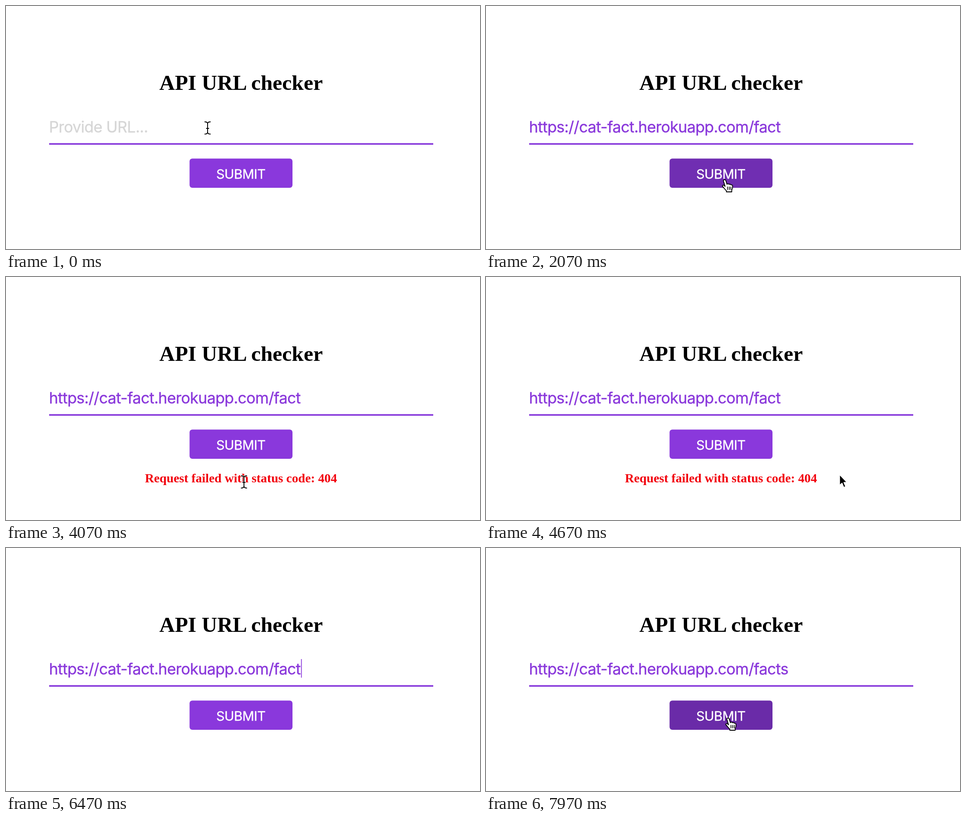
Animation of 1044x536 px, one loop 8 s. Source, as an HTML page:

```html
<!DOCTYPE html>
<html lang="en">
<head>
<meta charset="utf-8">
<title>API URL checker</title>
<style>
  html, body { margin: 0; width: 100%; height: 100%; overflow: hidden; background: #fff; }
  svg { display: block; width: 100%; height: 100%; }
  .serif { font-family: "Liberation Serif", Times, serif; font-weight: 700; text-anchor: middle; }
  .sans {
    font-family: Inter, "Open Sans", sans-serif; letter-spacing: -0.0195em;
    fill: currentColor; stroke: currentColor; stroke-width: .4;
  }
</style>
</head>
<body>
<svg viewBox="0 0 1044 536">
  <text class="serif" x="517.7" y="184.6" font-size="47.3">API URL checker</text>

  <text id="field" class="sans" x="94.8" y="279" font-size="34"></text>
  <rect id="caret" y="245" width="1.7" height="41" fill="#8a38db"/>
  <rect x="95" y="302.5" width="846" height="3.5" fill="#8739db"/>

  <rect id="button" x="404.3" y="336.4" width="226.7" height="64.6" rx="6"/>
  <text class="sans" x="517.2" y="381" font-size="29" color="#fff" text-anchor="middle">SUBMIT</text>
  <text id="error" class="serif" x="517.5" y="453" font-size="27.75" fill="#f2000c">Request failed with status code: 404</text>

  <defs>
    <path id="beamShape" d="M-6-13.5Q-1-13.5 0-10Q1-13.5 6-13.5M0-10V10M-6 13.5Q-1 13.5 0 10Q1 13.5 6 13.5M-2.5 1H2.5"/>
  </defs>
  <g id="pointer" stroke-linecap="round" stroke-linejoin="round">
    <g id="beam" fill="none">
      <use href="#beamShape" stroke="#fff" stroke-width="3.6"/>
      <use href="#beamShape" stroke="#000" stroke-width="1.9"/>
    </g>
    <path id="arrow" d="M0 0V23.5L5.3 18.6L9.2 28L13.2 26.3L9.3 17.2H16.3Z"
      fill="#000" stroke="#fff" stroke-width="1.6"/>
    <g id="hand">
      <path d="M-4 1C-4.5-2.5 .3-3 1.2 0L3.8 8.3C5 6.5 7.8 7 8.3 8.6C9.6 7.4 12 8 12.4 9.7C14 8.9 16 10 16.1 12C16.5 16 15.8 18.5 14.3 21V25H2.5V22.5C-.5 20-2.2 17-5.6 13.5C-7.6 11-4.6 9.2-2.4 11L-.4 12.8Z"
        fill="#fff" stroke="#000" stroke-width="1.8"/>
      <path d="M5 14V20M8.8 14V20M12.3 14V20" fill="none" stroke="#000" stroke-width="1.6"/>
    </g>
  </g>
</svg>
<script>
const LOOP = 8000;
const URL_TEXT = "https://cat-fact.herokuapp.com/fact";
const PASTE = 500, SUBMIT = 2050, FAIL = 3000, EDIT = 5340, TYPE = 6540, RESUBMIT = 7850;
const REST = [444, 269], FIELD_END = [687, 286], BUTTON = [527, 385], LABEL = [534.5, 377];
const LEAVE = 3360, SWING_PEAK = 3655, SWING_PERIOD = 820;
const SWING_END = SWING_PEAK + SWING_PERIOD;

const $ = id => document.getElementById(id);
const show = (id, on) => $(id).setAttribute("visibility", on ? "visible" : "hidden");
const between = (t, from, to) => t >= from && t < to;
const ramp = (t, start, duration) => Math.min(1, Math.max(0, (t - start) / duration));
const smooth = u => u * u * (3 - 2 * u);
const lerp = (a, b, u) => a.map((v, i) => v + (b[i] - v) * u);
const glide = (a, b, t, start, duration) => lerp(a, b, smooth(ramp(t, start, duration)));

// The pointer sweeps back and forth below the button.
function swing(t) {
  const c = Math.cos(2 * Math.PI * (t - SWING_PEAK) / SWING_PERIOD);
  return [664 + 140 * c, 464.5 + 12.5 * c];
}

function pointerAt(t) {
  if (t > 6650) return glide(FIELD_END, LABEL, t, 6650, 600);
  if (t > SWING_END) return glide(swing(SWING_END), FIELD_END, t, SWING_END, 655);
  if (t > LEAVE) return glide(LABEL, swing(t), t, LEAVE, 70);
  if (t > 2070) return glide(BUTTON, LABEL, t, 2070, 530);
  if (t > 1750) return glide(FIELD_END, BUTTON, t, 1750, 320);
  return glide(REST, FIELD_END, t, 970, 430);
}

function drawPointer(t, hasError) {
  const [x, y] = pointerAt(t);
  const inBox = (l, top, r, bottom) => between(x, l, r) && between(y, top, bottom);
  const visible = !between(t, PASTE, 970) && !between(t, 5700, 6650);
  const onButton = inBox(404, 336, 631, 401);
  const onText = inBox(95, 235, 941, 306) || hasError && inBox(306, 428, 729, 460);
  $("pointer").setAttribute("transform", `translate(${x} ${y})`);
  show("hand", visible && onButton);
  show("beam", visible && onText);
  show("arrow", visible && !onButton && !onText);
}

function draw(t) {
  const empty = t < PASTE, typed = t >= TYPE;
  const hasError = between(t, FAIL, EDIT);
  $("field").textContent = empty ? "Provide URL..." : URL_TEXT + (typed ? "s" : "");
  $("field").setAttribute("color", empty ? "#d6d6d6" : "#8a38db");

  const blinks = (from, to) => between(t, from, to) && (t - from) % 1000 < 500;
  $("caret").setAttribute("x", typed ? 666.8 : 649.8);
  show("caret", blinks(PASTE, SUBMIT) || blinks(EDIT, TYPE) || blinks(TYPE, RESUBMIT));

  const hover = ramp(t, 1910, 200) - ramp(t, 3350, 200) + ramp(t, 7020, 200);
  $("button").setAttribute("fill", `rgb(${lerp([138, 56, 220], [106, 43, 168], hover)})`);
  show("error", hasError);
  drawPointer(t, hasError);
}

function tick() {
  draw(performance.now() % LOOP);
  requestAnimationFrame(tick);
}
tick();
</script>
</body>
</html>
```
